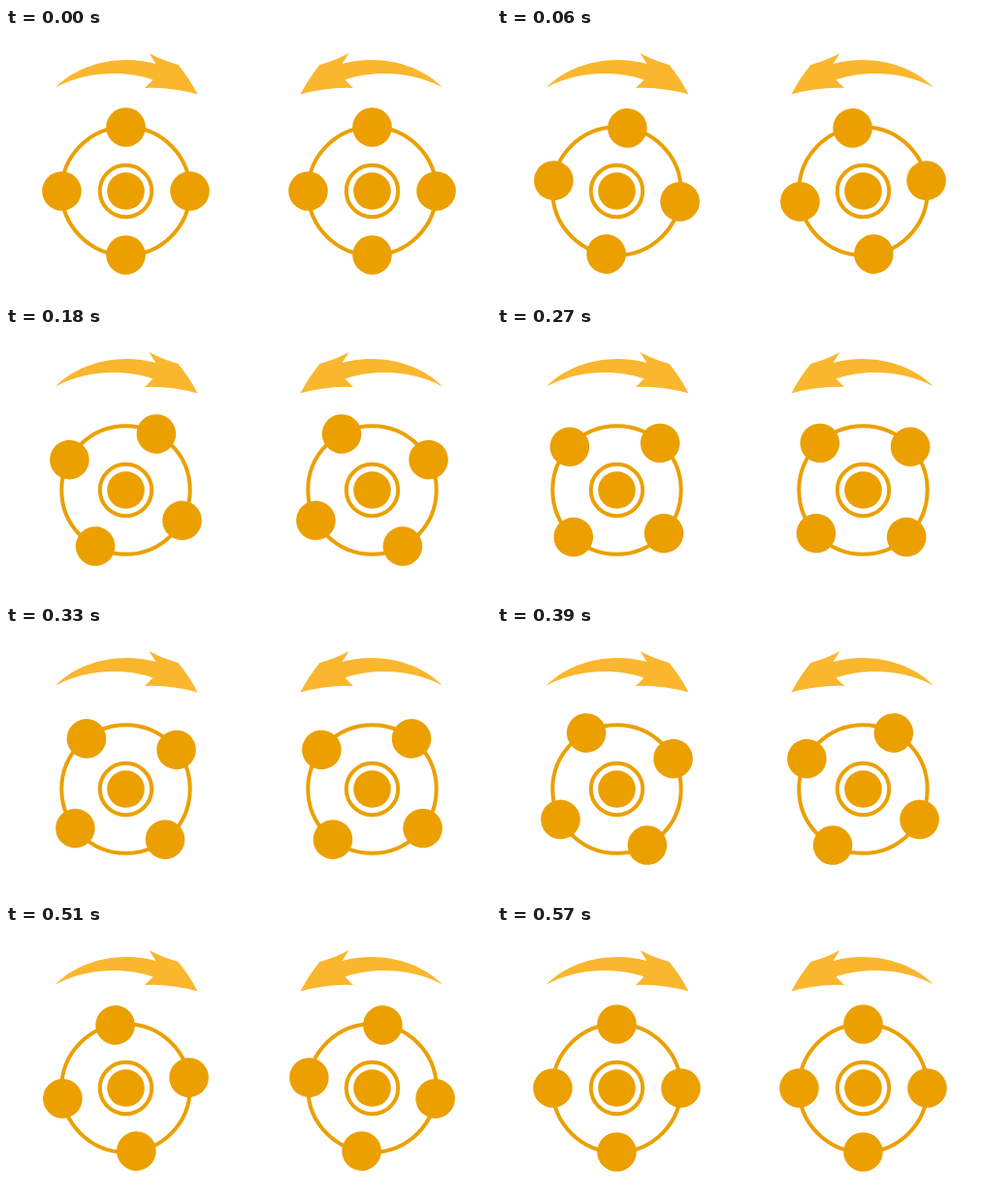
An HTML page that plays this animation: 500 px wide and 280 px high, repeating every 600 ms.

```html
<!DOCTYPE html>
<html lang="en">
<head>
<meta charset="utf-8">
<title>Counter-rotating wheels</title>
<style>
  html, body { margin: 0; width: 100%; height: 100%; overflow: hidden; background: #fff; }
  svg { display: block; width: 100%; height: 100%; }
</style>
</head>
<body>
<svg viewBox="0 0 500 280">
  <defs>
    <g id="half">
      <path fill="#fab62d" d="M51 61.5C74 38 115 26.500 154.500 37L147.500 26Q160 33 177.500 38Q189 52 197.500 68.500Q168 60.500 143 62L151.500 53.500C126 44.500 86 43 51 61.500Z"/>
      <g transform="translate(123.500 168.500)" fill="#eba000">
        <g fill="none" stroke="#eba000" stroke-width="4">
          <circle r="66.200"/>
          <circle r="26.700"/>
        </g>
        <circle r="19.300"/>
        <g id="balls">
          <circle cy="-66" r="20.300"/>
          <circle cx="66" r="20.300"/>
          <circle cy="66" r="20.300"/>
          <circle cx="-66" r="20.300"/>
        </g>
      </g>
    </g>
  </defs>
  <use href="#half"/>
  <use href="#half" transform="translate(501 0) scale(-1 1)"/>
</svg>
<script>
  const LOOP = 600, STEP = 30, LAST = LOOP / STEP - 1;
  const balls = document.getElementById('balls');
  const start = performance.now();

  // A quarter turn in even steps; the last pose equals the first.
  function draw(time) {
    const step = Math.floor((time % LOOP) / STEP);
    balls.setAttribute('transform', `rotate(${90 * step / LAST})`);
  }

  function tick(now) {
    draw(Math.max(0, now - start));
    requestAnimationFrame(tick);
  }

  draw(0);
  requestAnimationFrame(tick);
</script>
</body>
</html>
```
